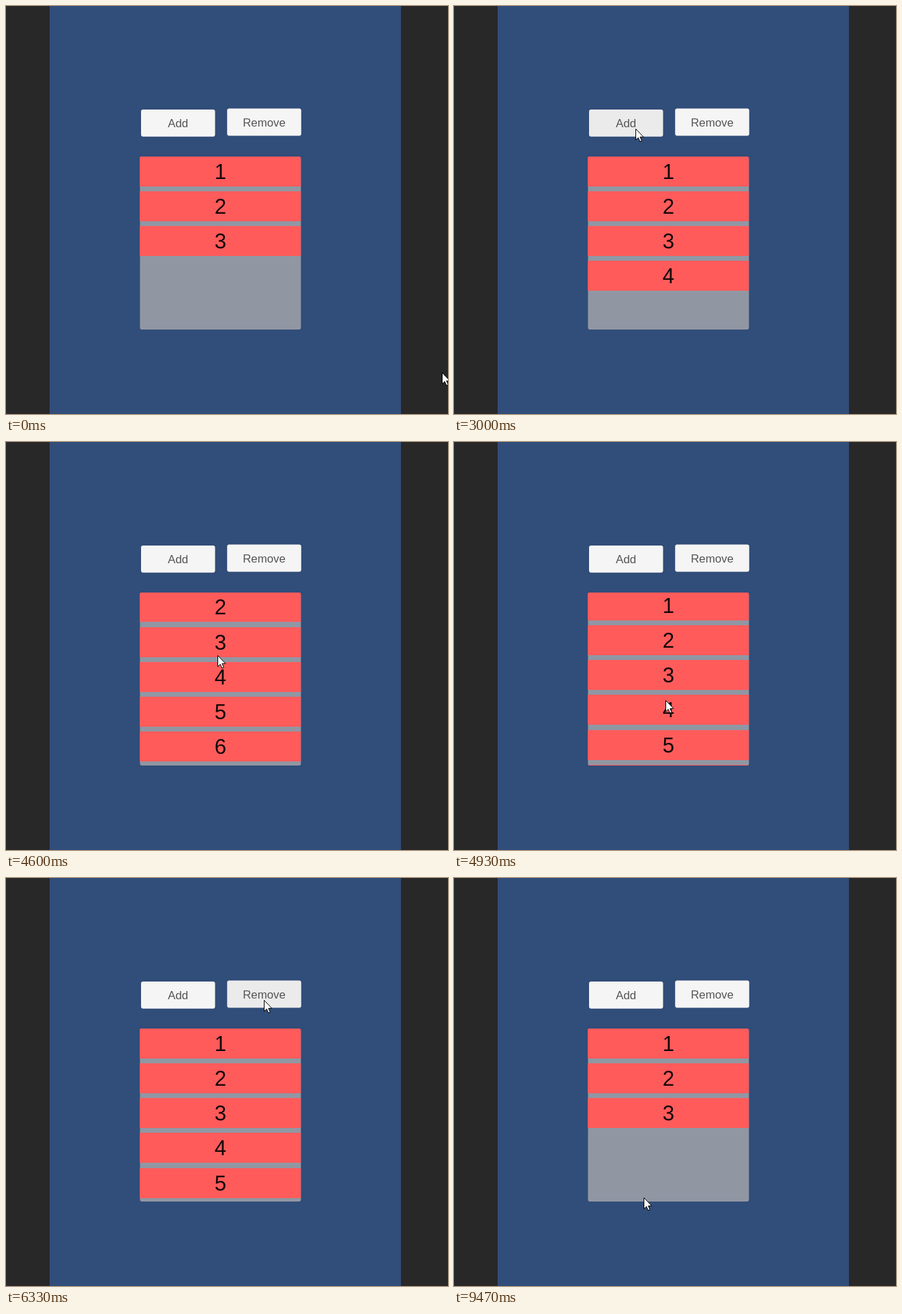
These frames come from a looping animation (648 by 599 pixels, 9.54 s). An HTML page:

```html
<!DOCTYPE html>
<html lang="en">
<head>
<meta charset="utf-8">
<title>Scroll list</title>
<style>
html, body { margin: 0; width: 100%; height: 100%; overflow: hidden; background: #282828; }
svg { display: block; width: 648px; height: 599px; }
text { font-family: "Liberation Sans", Arial, sans-serif; text-anchor: middle; }
.label { font-size: 16.8px; fill: #545454; }
.digit { font-size: 31px; fill: #140808; }
</style>
</head>
<body>
<svg viewBox="0 0 648 599">
  <defs>
    <clipPath id="mask"><rect x="196" y="221" width="236.4" height="254" rx="2.5"/></clipPath>
  </defs>
  <rect width="648" height="599" fill="#282828"/>
  <rect x="64" width="515" height="599" fill="#314d79"/>
  <rect id="add" x="198" y="152" width="108.5" height="39.8" rx="3"/>
  <text class="label" x="252.2" y="178">Add</text>
  <rect id="remove" x="324.2" y="150.6" width="108.6" height="39.8" rx="3"/>
  <text class="label" x="378.5" y="176.5">Remove</text>
  <rect x="196.4" y="221.2" width="236" height="253.8" rx="3" fill="#9097a3"/>
  <g id="list" clip-path="url(#mask)"></g>
  <path id="cursor" d="M.5 1.5V17.8L4.2 14.3L6.7 20.1L9.3 19L6.8 13.3H11.8Z"
        fill="#fff" stroke="#000"/>
</svg>
<script>
const LOOP = 9540, TICK = 1000 / 15;
const TOP = 221, VIEW = 254, ROW = 44, PITCH = 51.25, MAX_ROWS = 6;
const MAX_SCROLL = (MAX_ROWS - 1) * PITCH + ROW - VIEW;
const SPRING = 0.85;   // return speed per tick after a drag is let go
const NORMAL = '#f5f5f5', ACTIVE = '#ebebeb', PRESSED = '#cfcfcf';
const $ = id => document.getElementById(id);

// Turning points of the pointer: [tick, x, y]
const route = [
  [0, 639, 537], [11, 208, 283], [20, 336, 290], [30, 314, 160], [38, 266, 179], [54, 266, 179],
  [59, 313, 361], [64, 312, 257], [71, 309, 333.5], [78, 312, 438], [82, 330, 430],
  [84, 355, 286], [93, 378, 178], [107, 378, 178], [110, 376, 221], [115, 355, 480],
  [121, 350, 206], [132, 118, 600], [138, 118, 600], [142, 278, 468], [144, 278, 468]
];
const drags = [{ from: 59, to: 66 }, { from: 71, to: 82 }];
const addClicks = [43, 48, 53], removeClicks = [97, 101, 106];

function pointer(k) {
  const i = route.findIndex(p => p[0] > k);
  const [t0, x0, y0] = route[i - 1], [t1, x1, y1] = route[i];
  const f = (k - t0) / (t1 - t0);
  return { x: x0 + (x1 - x0) * f, y: y0 + (y1 - y0) * f };
}

const clamp = v => Math.max(0, Math.min(MAX_SCROLL, v));

// Past either end, the list follows the pointer with growing resistance.
function stretch(raw) {
  const over = raw - clamp(raw);
  return clamp(raw) + Math.sign(over) * VIEW * (1 - 1 / (Math.abs(over) * 0.55 / VIEW + 1));
}

function scrollAt(k, n = drags.length - 1) {
  if (n < 0) return 0;
  const { from, to } = drags[n];
  if (k <= from) return scrollAt(k, n - 1);
  const end = Math.min(k, to);
  const pos = stretch(scrollAt(from, n - 1) + pointer(from).y - pointer(end).y);
  const t = (k - end) * SPRING;
  return clamp(pos) + (pos - clamp(pos)) * (1 + t) * Math.exp(-t);
}

function buttonColor(k, clicks, from, to) {
  if (clicks.includes(k)) return PRESSED;
  return k >= from && k < to ? ACTIVE : NORMAL;
}

function make(parent, tag, attrs) {
  const el = document.createElementNS('http://www.w3.org/2000/svg', tag);
  for (const name in attrs) el.setAttribute(name, attrs[name]);
  return parent.appendChild(el);
}

const rows = Array.from({ length: MAX_ROWS }, (_, i) => {
  const g = make($('list'), 'g', {});
  make(g, 'rect', { x: 196, width: 236.4, height: ROW, fill: '#ff5b5b' });
  make(g, 'text', { class: 'digit', x: 314.4, y: 33 }).textContent = i + 1;
  return g;
});

const move = (el, x, y) => el.setAttribute('transform', `translate(${x} ${y})`);

function render(time) {
  const k = Math.floor((time % LOOP + 3.4) / TICK);
  const done = clicks => clicks.filter(c => k > c).length;
  const count = 3 + done(addClicks) - done(removeClicks);
  const scroll = scrollAt(k), { x, y } = pointer(k);
  rows.forEach((row, i) => {
    row.setAttribute('display', i < count ? 'inline' : 'none');
    move(row, 0, Math.floor(TOP + i * PITCH - scroll));
  });
  move($('cursor'), Math.round(x), Math.round(y));
  $('add').setAttribute('fill', buttonColor(k, addClicks, 31, 59));
  $('remove').setAttribute('fill', buttonColor(k, removeClicks, 91, 115));
}

const start = performance.now();
function tick() {
  render(performance.now() - start);
  requestAnimationFrame(tick);
}
tick();
</script>
</body>
</html>
```
